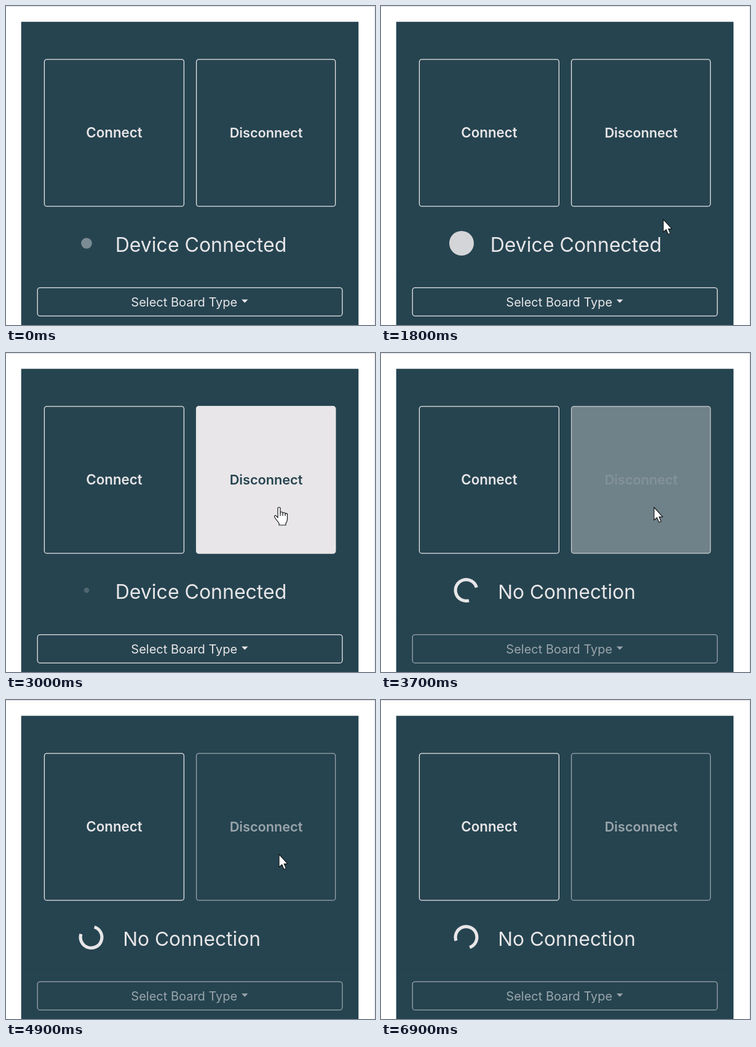
These frames come from a looping animation (600x519 px, 7 s). An HTML page with a canvas:

```html
<!DOCTYPE html>
<html lang="en">
<head>
<meta charset="utf-8">
<title>Device connection</title>
<style>
  html, body { margin: 0; width: 100%; height: 100%; overflow: hidden; background: #fff; }
  canvas { display: block; width: 600px; height: 519px; }
</style>
</head>
<body>
<canvas id="stage" width="600" height="519"></canvas>
<script>
const ctx = document.getElementById('stage').getContext('2d');
const LOOP = 7000, STEP = 100;
const HOVER_AT = 1920, DISCONNECT_AT = 3637, FADE = 150;
const PANEL = '#264450', LIGHT = '#e8e6e8', DISABLED = 0.6;
const FAMILY = '"Century Gothic", Inter, sans-serif';

// Pointer keys: time, x, y of the tip
const PATH = [
  [1200, 567, 497], [1400, 495, 405], [1600, 463, 360], [1800, 459, 347],
  [2000, 449, 308], [2200, 444, 278], [2500, 444, 256], [2700, 444, 251],
  [5200, 444, 251], [5400, 450, 255], [5600, 468, 265], [5900, 565, 312]
];

const HAND = new Path2D('M-2 17 V2 Q-2 0 0 0 Q2 0 2 2 V9 Q2 7.5 4 7.5 Q6 7.5 6 10 ' +
  'Q6 8.5 8 8.5 Q10 8.5 10 11 Q10 9.8 11.8 9.8 Q13.5 9.8 13.5 12 V19 ' +
  'Q13.5 23 11 26 V29 H0 V26 L-6.5 17.5 Q-8.5 14.5 -6.5 13.5 Q-5 13 -2 17 Z');
const KNUCKLES = new Path2D('M2 9 V14 M6 10 V14 M10 11 V14');
const ARROW = new Path2D('M0 0 V21 L4.7 16.8 L8 24.5 L11.4 23 L8.2 15.6 H14 Z');

const clamp01 = v => Math.max(0, Math.min(1, v));
const fadeFrom = (t, begin) => {
  const k = clamp01((t - begin) / FADE);
  return k * k * (3 - 2 * k);
};

function pointerAt(t) {
  const i = PATH.findIndex(key => key[0] >= t);
  if (i < 1) return null;
  const [t0, x0, y0] = PATH[i - 1], [t1, x1, y1] = PATH[i];
  const k = (t - t0) / (t1 - t0);
  return { x: x0 + (x1 - x0) * k, y: y0 + (y1 - y0) * k };
}

function text(str, x, y, size, weight, align, color = LIGHT) {
  ctx.font = `${weight} ${size}px ${FAMILY}`;
  ctx.textAlign = align;
  ctx.fillStyle = color;
  ctx.fillText(str, x, y);
}

function box(x, y, w, h) {
  ctx.beginPath();
  ctx.roundRect(x, y, w, h, 4);
  ctx.lineWidth = 1.3;
  ctx.strokeStyle = LIGHT;
  ctx.stroke();
}

function withAlpha(alpha, draw) {
  ctx.save();
  ctx.globalAlpha = alpha;
  draw();
  ctx.restore();
}

function drawPage() {
  ctx.fillStyle = '#fff';
  ctx.fillRect(0, 0, 600, 519);
  ctx.fillStyle = '#d9d9dd';
  ctx.fillRect(0, 0, 600, 1);
  ctx.fillStyle = '#f1f1f3';
  ctx.fillRect(598, 1, 2, 518);
  ctx.fillStyle = PANEL;
  ctx.fillRect(24.7, 25.7, 548.5, 493.3);
  ctx.fillStyle = '#23404b';
  ctx.fillRect(25, 436, 548, 1);
}

function drawDisconnect(hover, opacity) {
  const label = color => text('Disconnect', 423, 213.5, 21.7, 600, 'center', color);
  withAlpha(opacity, () => {
    box(309.6, 86.9, 226, 239);
    label(LIGHT);
  });
  if (hover > 0) withAlpha(hover * opacity, () => {
    ctx.fillStyle = LIGHT;
    box(309.6, 86.9, 226, 239);
    ctx.fill();
    label(PANEL);
  });
}

function drawSelect(opacity) {
  withAlpha(opacity, () => {
    box(51.2, 458.3, 495.6, 46);
    text('Select Board Type', 203.3, 488.5, 20, 400, 'left');
    ctx.beginPath();
    ctx.moveTo(383, 477.5);
    ctx.lineTo(393.5, 477.5);
    ctx.lineTo(388.2, 483);
    ctx.fill();
  });
}

// Grows to full size, then fades out
function drawPulse(t) {
  const phase = (t / 772 + 0.22) % 1;
  withAlpha(phase < 0.5 ? phase * 2 : 2 - phase * 2, () => {
    ctx.fillStyle = LIGHT;
    ctx.beginPath();
    ctx.arc(131, 386, 20 * Math.min(1, phase * 2), 0, 7);
    ctx.fill();
  });
}

// The gap starts on the right and turns clockwise
function drawSpinner(t) {
  const gap = (t - DISCONNECT_AT) / 755 * Math.PI * 2;
  ctx.beginPath();
  ctx.arc(138.5, 386, 17.4, gap + Math.PI / 4, gap + Math.PI * 7 / 4);
  ctx.lineWidth = 5.2;
  ctx.strokeStyle = LIGHT;
  ctx.stroke();
}

function drawPointer(p, isHand) {
  ctx.save();
  ctx.translate(p.x, p.y);
  ctx.lineJoin = 'round';
  ctx.lineWidth = 1.2;
  ctx.strokeStyle = '#15191c';
  ctx.fillStyle = '#fff';
  const shape = isHand ? HAND : ARROW;
  ctx.fill(shape);
  ctx.stroke(shape);
  if (isHand) ctx.stroke(KNUCKLES);
  ctx.restore();
}

function render(t) {
  const connected = t < DISCONNECT_AT;
  const opacity = connected ? 1 : DISABLED;
  const hover = fadeFrom(t, HOVER_AT) - fadeFrom(t, DISCONNECT_AT);
  const pointer = pointerAt(t);

  drawPage();
  box(62.4, 86.9, 227, 239);
  text('Connect', 176, 213.5, 22.3, 600, 'center');
  drawDisconnect(hover, opacity);
  drawSelect(opacity);

  if (connected) {
    drawPulse(t);
    text('Device Connected', 317, 399.5, 32, 400, 'center');
  } else {
    drawSpinner(t);
    text('No Connection', 302, 399.5, 31.7, 400, 'center');
  }
  if (pointer) drawPointer(pointer, connected && t > HOVER_AT);
}

const start = performance.now();
function frame() {
  const t = (performance.now() - start) % LOOP;
  render(Math.floor(t / STEP) * STEP);
  requestAnimationFrame(frame);
}
frame();
</script>
</body>
</html>
```
